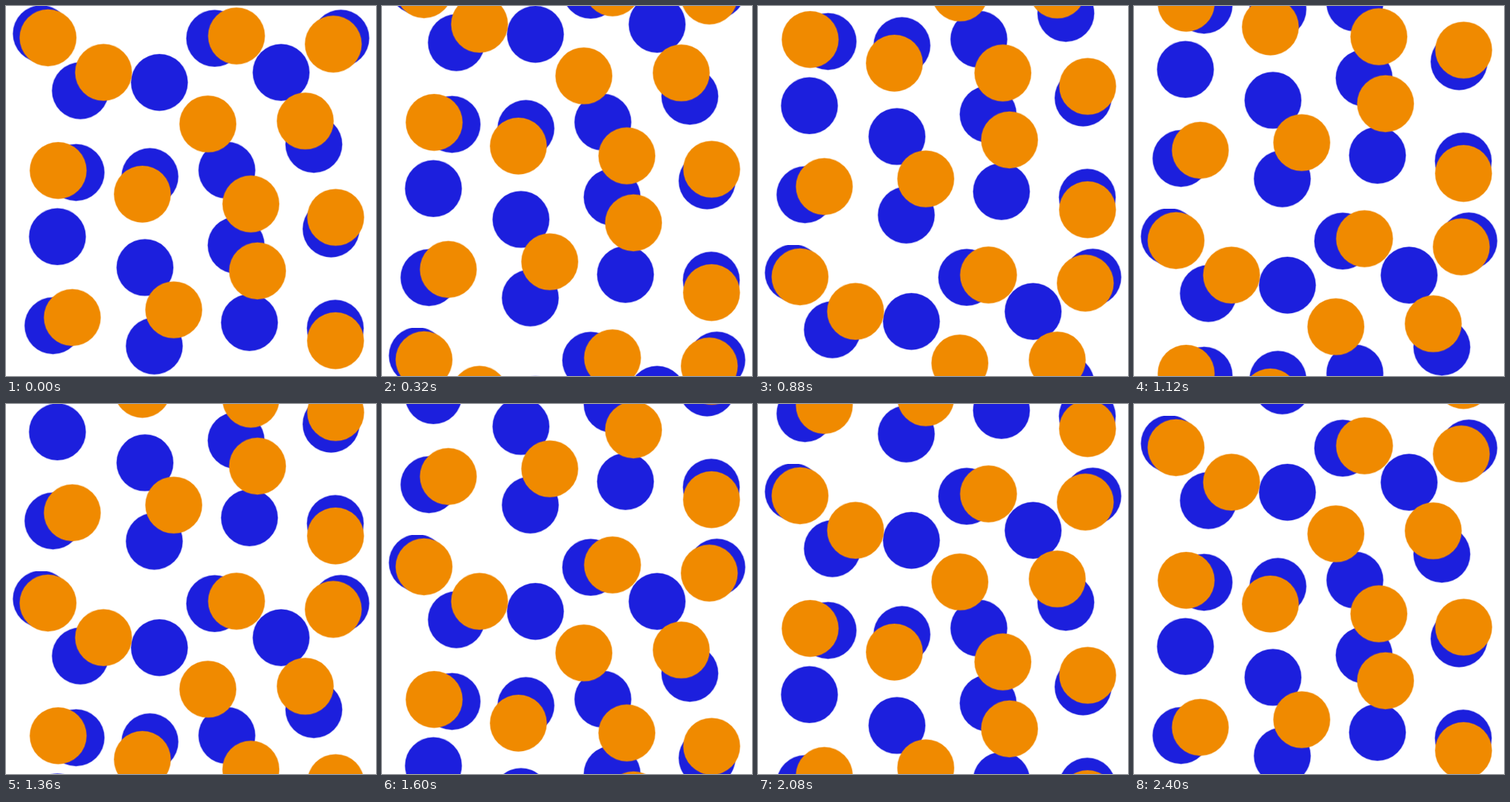
Animation of 500 by 500 pixels, one loop 2480 ms. Source, as an HTML page:

```html
<!DOCTYPE html>
<html lang="en">
<head>
<meta charset="utf-8">
<title>Scrolling dots</title>
<style>
  html, body { margin: 0; width: 100%; height: 100%; overflow: hidden; background: #fff; }
  #stage { display: block; width: 100vw; height: 100vh; }
  circle { r: 38.2px; stroke: currentColor; stroke-opacity: .35; stroke-width: 1.4; fill: currentColor; paint-order: stroke; }
</style>
</head>
<body>
<svg id="stage" viewBox="0 0 500 500">
  <defs>
    <clipPath id="edge"><rect width="500" height="500"/></clipPath>
    <g id="tile" clip-path="url(#edge)"></g>
  </defs>
  <g id="strip">
    <use href="#tile"/>
    <use href="#tile" y="500"/>
  </g>
</svg>
<script>
const SIZE = 500, STEPS = 31, STEP_MS = 80;

// Scattered dot centres, lower layer first.
const layers = {
  '#1c1fdd': `47.7,37.5 100.5,114.5 207.3,103.3 282,43.7 371.8,89.8 452.5,43.5
    416,187 94.7,225 194.5,230.5 298.5,222 69.5,311.7 311,323.3
    439.3,301.3 187.8,353.4 63.5,432 329,427.8 200.4,459.5 445,435.5`,
  '#f08a00': `56.8,43 131.8,89.7 311.5,40.5 442.3,51.5 272.8,159.4 404.4,155.4 70.5,222.3
    184.3,254.3 330.9,267.5 445.5,285.6 339.9,358 89.6,421 226.7,410.6 445.3,452.3`
};

const dot = point => {
  const [x, y] = point.split(',');
  return `<circle cx="${x}" cy="${y}"/>`;
};

document.getElementById('tile').innerHTML = Object.entries(layers)
  .map(([color, points]) => `<g color="${color}">${points.split(/\s+/).map(dot).join('')}</g>`)
  .join('');

const strip = document.getElementById('strip');
const start = performance.now();

// Scroll up one tile per loop, in whole pixels.
function draw() {
  const elapsed = Math.max(0, performance.now() - start);
  const step = Math.floor(elapsed / STEP_MS) % STEPS;
  strip.setAttribute('transform', `translate(0 ${-Math.round(step * SIZE / STEPS)})`);
  requestAnimationFrame(draw);
}
draw();
</script>
</body>
</html>
```
